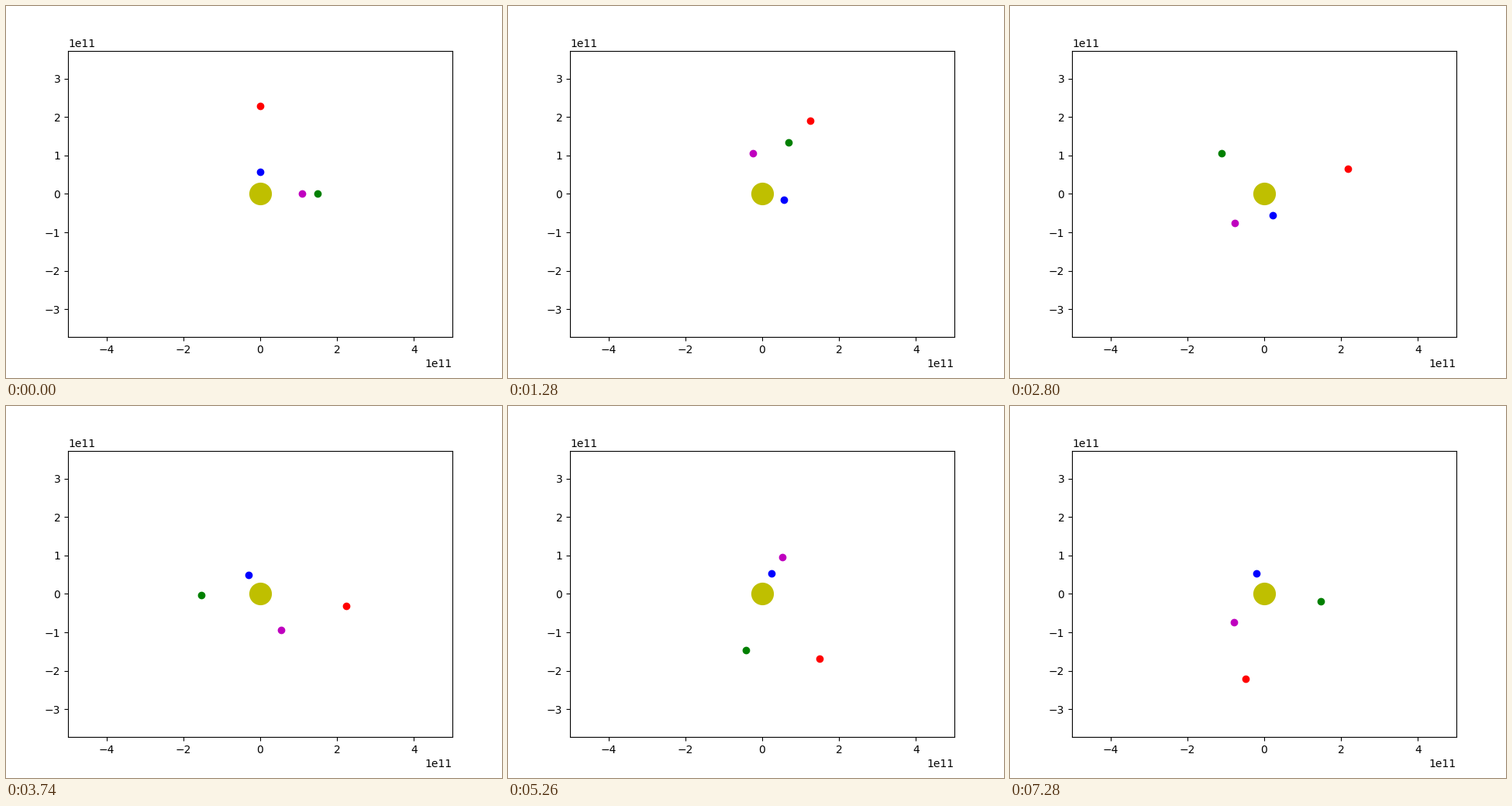
Write a matplotlib script that moves like this. It is 640 px wide and 480 px high and loops after 7.3 s.

```python
import numpy as np
import matplotlib.pyplot as plt
from matplotlib.animation import FuncAnimation

DAYS = 365
INTERVAL = 20

# colour, mean distance (m), eccentricity, degrees per day, start angle, direction
ORBITS = [
    ("b", 5.887e10, 0.0145, 4.012, 90, 1),
    ("m", 1.0807e11, 0.0005, 1.6027, 0, 1),
    ("g", 1.5133e11, 0.0125, 0.9688, 0, 1),
    ("r", 2.2663e11, -0.0055, 0.5284, 90, -1),
]


def position(day, a, e, rate, start, direction):
    """Point on a nearly circular Kepler orbit that starts on its main axis."""
    mean = np.radians(rate * day)
    true = mean + 2 * e * np.sin(mean) + 1.25 * e**2 * np.sin(2 * mean)
    r = a * (1 - e**2) / (1 + e * np.cos(true))
    angle = np.radians(start) + direction * true
    return r * np.cos(angle), r * np.sin(angle)


plt.rcParams["font.family"] = "DejaVu Sans"
fig, ax = plt.subplots(figsize=(6.4, 4.8), dpi=100)
half_w = 5e11
half_h = half_w * 369.6 / 496
ax.set_xlim(-half_w, half_w)
ax.set_ylim(-half_h, half_h)

ax.plot([0], [0], "yo", markersize=20)
planets = [ax.plot([], [], color + "o", markersize=6)[0]
           for color, *_ in ORBITS]


def update(day):
    for planet, (_, *orbit) in zip(planets, ORBITS):
        x, y = position(day, *orbit)
        planet.set_data([x], [y])
    return planets


def init():
    return update(0)


anim = FuncAnimation(fig, update, frames=DAYS, init_func=init,
                     interval=INTERVAL, repeat=True, repeat_delay=0, blit=True)

plt.show()
```
